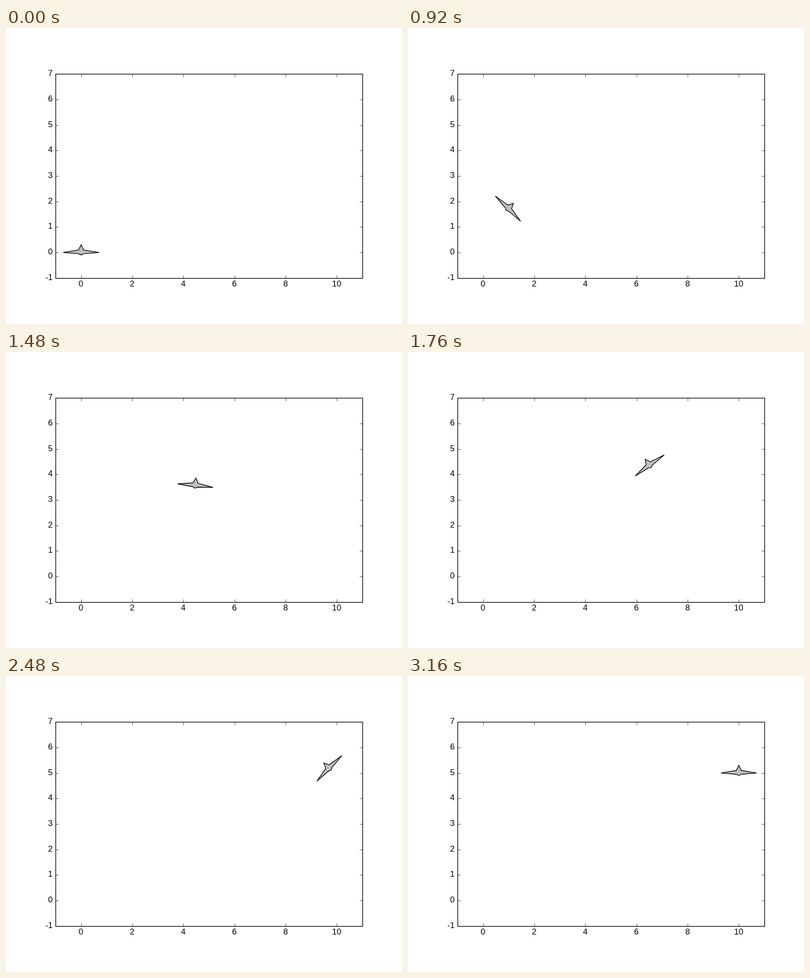
Write an HTML page that moves like this. It is 800x600 px and loops after 3200 ms.

```html
<!DOCTYPE html>
<html lang="en">
<head>
<meta charset="utf-8">
<title>Planar flight</title>
<style>
html, body { margin: 0; width: 100%; height: 100%; overflow: hidden; background: #fff; }
svg { display: block; width: 800px; height: 600px; }
text { font: 16.67px "Liberation Sans", Arial, sans-serif; }
</style>
</head>
<body>
<svg viewBox="0 0 800 600">
  <g id="ticks" stroke="#000" stroke-width="0.69"></g>
  <g id="labels"></g>
  <polygon id="craft" fill="#bfbfbf" stroke="#000" stroke-width="1.39" stroke-miterlimit="4"/>
  <rect x="100.5" y="93.5" width="620" height="414" fill="none" stroke="#000" stroke-width="1.39"/>
</svg>
<script>
const STEP = 40, LOOP = 3200, UNIT = 620 / 12;
const px = x => 100 + (x + 1) * UNIT;
const py = y => 300 + (3 - y) * UNIT;
const snap = v => Math.round(v) + 0.5;
const byId = id => document.getElementById(id);

function add(parent, name, attrs, content = '') {
  const el = document.createElementNS('http://www.w3.org/2000/svg', name);
  for (const key in attrs) el.setAttribute(key, attrs[key]);
  el.textContent = content;
  byId(parent).append(el);
}
const tick = d => add('ticks', 'path', { d });
const label = (x, y, anchor, value) =>
  add('labels', 'text', { x, y, 'text-anchor': anchor }, value);

for (let x = 0; x <= 10; x += 2) {
  const p = snap(px(x));
  tick(`M${p} 507.5v-6M${p} 93.5v6`);
  label(px(x) - 0.2, 524.3, 'middle', x);
}
for (let y = -1; y <= 7; y++) {
  const p = snap(py(y));
  tick(`M100.5 ${p}h6M720.5 ${p}h-6`);
  label(94.3, Math.round(py(y)) + 4, 'end', y);
}

// Waypoints: step, x, y, clockwise tilt in degrees
const route = [
  [0, 0, 0, 0],
  [7.5, 0.006, 0.084, 7],
  [15, 0.159, 0.675, 27.1],
  [22.5, 0.895, 1.648, 44.4],
  [31, 2.733, 2.797, 35.8],
  [44, 6.515, 4.355, -36.1],
  [54, 8.753, 5.104, -63.9],
  [62, 9.708, 5.183, -45.8],
  [71, 9.991, 5.037, -12.5],
  [79, 10, 5, 0]
];

// Cubic spline with continuous curvature, at rest at both ends
function spline(column) {
  const t = route.map(p => p[0]), v = route.map(p => p[column]);
  const slope = v.map(() => 0), last = t.length - 1;
  for (let pass = 0; pass < 40; pass++) {
    for (let i = 1; i < last; i++) {
      const a = 1 / (t[i] - t[i - 1]), b = 1 / (t[i + 1] - t[i]);
      const pull = 3 * ((v[i] - v[i - 1]) * a * a + (v[i + 1] - v[i]) * b * b);
      slope[i] = (pull - slope[i - 1] * a - slope[i + 1] * b) / (2 * (a + b));
    }
  }
  return k => {
    let i = 0;
    while (i < last - 1 && k > t[i + 1]) i++;
    const h = t[i + 1] - t[i], s = (k - t[i]) / h, r = 1 - s;
    return v[i] + (v[i + 1] - v[i]) * s * s * (3 - 2 * s)
      + h * s * r * (slope[i] * r - slope[i + 1] * s);
  };
}
const [xAt, yAt, tiltAt] = [1, 2, 3].map(spline);

const half = [[0, 0.3], [0.1, 0.1], [0.7, 0], [0.1, -0.05], [0, -0.1]];
const hull = [...half, ...half.slice(1, -1).reverse().map(([u, v]) => [-u, v])];

function draw(ms) {
  const k = Math.floor(ms % LOOP / STEP);
  const x = xAt(k), y = yAt(k), angle = tiltAt(k) * Math.PI / 180;
  const c = Math.cos(angle), s = Math.sin(angle);
  byId('craft').setAttribute('points', hull.map(([u, v]) =>
    `${px(x + u * c + v * s).toFixed(2)},${py(y - u * s + v * c).toFixed(2)}`).join(' '));
}

function loop(now) {
  draw(now);
  requestAnimationFrame(loop);
}
draw(0);
requestAnimationFrame(loop);
</script>
</body>
</html>
```
